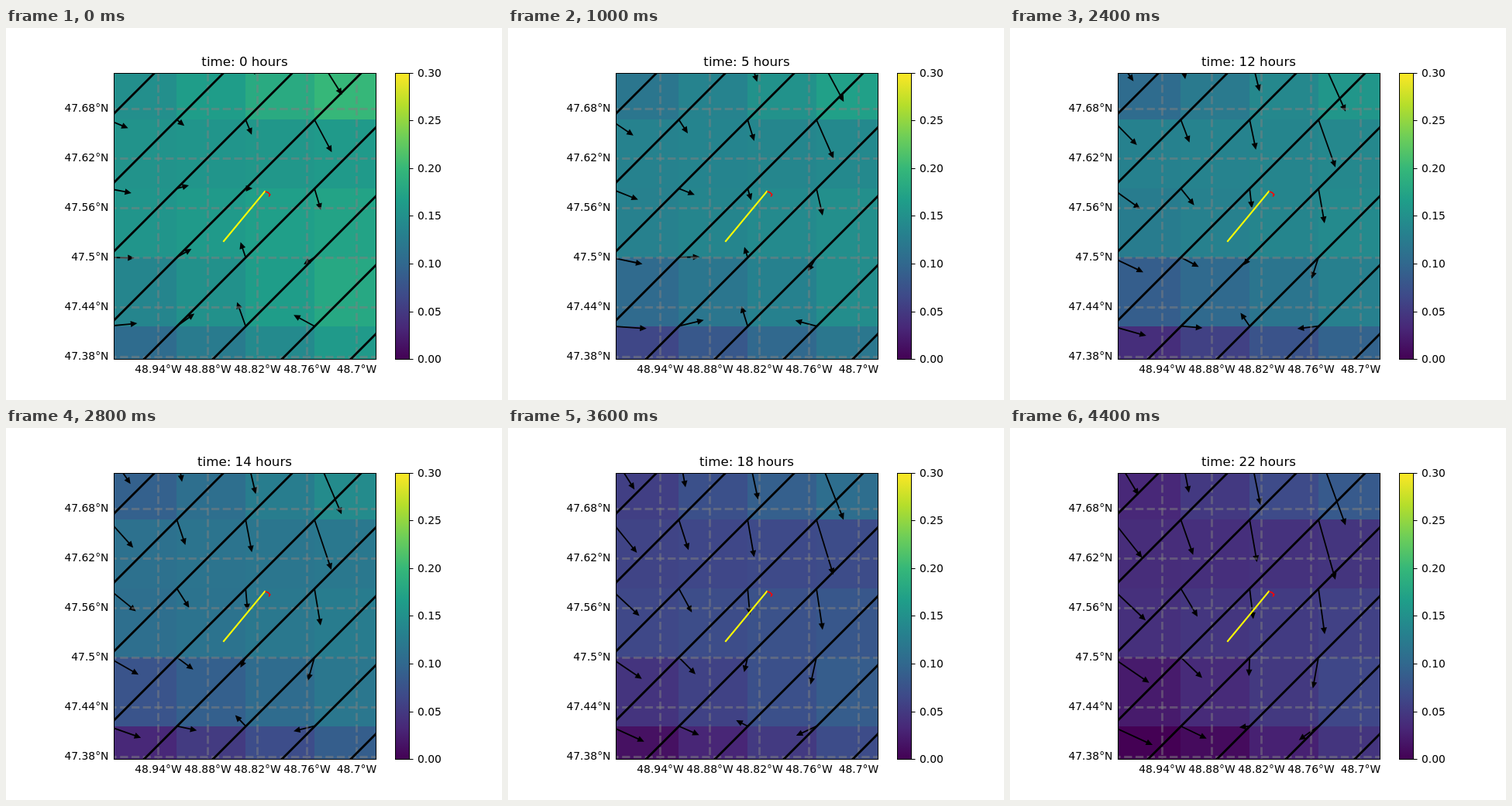
An HTML page that plays this animation: 640x480 px, repeating every 4.6 s.

```html
<!DOCTYPE html>
<html lang="en">
<head>
<meta charset="utf-8">
<title>Hourly drift map</title>
<style>
html, body { margin: 0; width: 100%; height: 100%; overflow: hidden; background: #fff; }
svg { display: block; width: 640px; height: 480px; }
text { font-family: "DejaVu Sans", sans-serif; font-size: 13.89px; }
.title { font-size: 16.67px; }
.axis { fill: none; stroke: #000; stroke-width: 1; }
.crisp { shape-rendering: crispEdges; }
</style>
</head>
<body>
<svg id="stage" viewBox="0 0 640 480"></svg>
<script>
const STEP = 200, HOURS = 23, HEAD = 8.5, CELL = 88.8, MAX_SPEED = .3;
const box = { left: 139.5, top: 58.5, width: 338, height: 369 };
const right = box.left + box.width, bottom = box.top + box.height;

// Flow per column: value in the top row, change per row, eastward drift per hour and sway.
const columns = [
  { vx: 14.5, vxRow: 3.7, vy: 11.2, vyRow: -3.5, drift: .7, sway: 1.5 },
  { vx: -1, vxRow: 4.2, vy: 7.2, vyRow: -4.6, drift: .45, sway: 1.5 },
  { vx: 9, vxRow: -4.3, vy: 23, vyRow: -11.5, drift: .15, sway: .5 },
  { vx: 31, vxRow: -12.6, vy: 49.5, vyRow: -15, drift: .05, sway: 0 }
];
// Speed per row, relative to the mean: both ends and the midday change.
const rows = [
  { west: -.009, east: .043, midday: -.004 },
  { west: -.004, east: .004, midday: .02 },
  { west: -.001, east: .016, midday: .01 },
  { west: -.02, east: .022, midday: -.01 },
  { west: -.052, east: .004, midday: -.03 }
];
const viridisStops = ["#440154", "#482878", "#3e4a89", "#31688e", "#26828e",
  "#1f9e89", "#35b779", "#6ece58", "#b5de2b", "#fde725"];

const mix = (a, b, t) => a + (b - a) * t;
const clamp = t => Math.min(1, Math.max(0, t));

function viridis(t) {
  const place = clamp(t) * (viridisStops.length - 1);
  const i = Math.min(Math.floor(place), viridisStops.length - 2);
  const channel = (hex, k) => parseInt(hex.slice(1 + 2 * k, 3 + 2 * k), 16);
  const rgb = [0, 1, 2].map(k =>
    Math.round(mix(channel(viridisStops[i], k), channel(viridisStops[i + 1], k), place - i)));
  return `rgb(${rgb})`;
}

function speedAt(row, col, hour) {
  const mean = .164 - .005 * hour - .014 * Math.cos(2 * Math.PI * (hour - 3) / 17.5);
  const midday = hour > 3 && hour < 17 ? Math.sin(Math.PI * (hour - 3) / 14) : 0;
  const { west, east, midday: change } = rows[row];
  return mean + mix(west, east, col / 3) + midday * change;
}

function flowAt(row, col, hour) {
  const c = columns[col];
  const sway = c.sway * row * Math.sin(2 * Math.PI * hour / 22);
  return {
    dx: c.vx + c.vxRow * row + c.drift * hour + sway,
    dy: c.vy + c.vyRow * row + (1.75 - .17 * row) * hour
  };
}

const stage = document.getElementById("stage");
function add(tag, attrs, parent = stage, text = "") {
  const el = document.createElementNS("http://www.w3.org/2000/svg", tag);
  for (const key in attrs) el.setAttribute(key, attrs[key]);
  el.textContent = text;
  parent.appendChild(el);
  return el;
}
const frame = (x, width) =>
  add("rect", { x, y: box.top, width, height: box.height, class: "axis crisp" });
const label = (x, y, anchor, text) =>
  add("text", { x, y, "text-anchor": anchor }, stage, text);

const defs = add("defs", {});
const clip = add("clipPath", { id: "map" }, defs);
add("rect", { x: box.left, y: box.top, width: box.width, height: box.height }, clip);
const ramp = add("linearGradient", { id: "ramp", x1: 0, y1: 1, x2: 0, y2: 0 }, defs);
viridisStops.forEach((color, i) =>
  add("stop", { offset: i / (viridisStops.length - 1), "stop-color": color }, ramp));

const map = add("g", { "clip-path": "url(#map)" });
const cellLayer = add("g", { class: "crisp" }, map);
const arrowLayer = add("g", {}, map);
const nodes = [];
for (let row = 0; row < 5; row++) {
  for (let col = 0; col < 4; col++) {
    const x = 131.6 + CELL * col, y = 29.5 + CELL * row;
    const cell = add("rect", { x: Math.round(x), y: Math.round(y), width: 90, height: 90 }, cellLayer);
    const arrow = add("g", {}, arrowLayer);
    const shaft = add("line", { x1: 0, stroke: "#000", "stroke-width": 1.8 }, arrow);
    const head = add("path", { d: `M${HEAD} 0L0 -4V4Z` }, arrow);
    nodes.push({ row, col, x, y, cell, arrow, shaft, head });
  }
}

// Graticule; the dashes of the meridians begin below the map.
const grid = add("g", {
  stroke: "#808080", "stroke-opacity": .5, "stroke-width": 2.78, "stroke-dasharray": "10.28 4.44"
}, map);
for (let i = 0; i < 5; i++) {
  const x = 196.5 + 64 * i;
  add("line", { x1: x, x2: x, y1: 481, y2: box.top }, grid);
  label(x, 445, "middle", +(48.94 - .06 * i).toFixed(2) + "°W");
}
for (let i = 0; i < 6; i++) {
  const y = 104.5 + 64 * i;
  add("line", { x1: 132.5, x2: right, y1: y, y2: y }, grid);
  label(132.5, y + 3.5, "end", +(47.68 - .06 * i).toFixed(2) + "°N");
}

// Diagonals and tracks.
for (let i = 0; i < 8; i++) {
  const sum = 249.8 + 88.9 * i;
  add("line", {
    x1: sum - 440, y1: 440, x2: sum - 40, y2: 40, stroke: "#000", "stroke-width": 2.8
  }, map);
}
add("path", {
  d: "M281 275L334 211", fill: "none", stroke: "#ff0", "stroke-width": 2.1, "stroke-linecap": "square"
}, map);
add("path", {
  d: "M334.5 211L338 212.2L340.7 214.8L339.2 217.5", fill: "none", stroke: "#f00", "stroke-width": 1.6
}, map);
frame(box.left, box.width);

// Colour bar.
add("rect", { x: 502.5, y: box.top, width: 18, height: box.height, fill: "url(#ramp)" });
frame(502.5, 18);
for (let i = 0; i <= 6; i++) {
  const y = Math.round(427.2 - 61.6 * i);
  add("line", { x1: 520.5, x2: 525.5, y1: y + .5, y2: y + .5, class: "axis" });
  label(531, y + 5, "start", (i * .05).toFixed(2));
}
const title = add("text", { x: 308, y: 49, "text-anchor": "middle", class: "title" });

function show(hour) {
  title.textContent = `time: ${hour} hours`;
  for (const { row, col, x, y, cell, arrow, shaft } of nodes) {
    cell.setAttribute("fill", viridis(speedAt(row, col, hour) / MAX_SPEED));
    const { dx, dy } = flowAt(row, col, hour);
    const angle = Math.atan2(dy, dx) * 180 / Math.PI;
    arrow.setAttribute("transform", `translate(${x + dx} ${y + dy}) rotate(${angle})`);
    shaft.setAttribute("x1", -Math.hypot(dx, dy));
    shaft.setAttribute("x2", 1);
  }
}

let shown = 0;
const start = performance.now();
function tick(now) {
  const hour = Math.floor(Math.max(0, now - start) / STEP) % HOURS;
  if (hour !== shown) show(shown = hour);
  requestAnimationFrame(tick);
}
show(shown);
requestAnimationFrame(tick);
</script>
</body>
</html>
```
